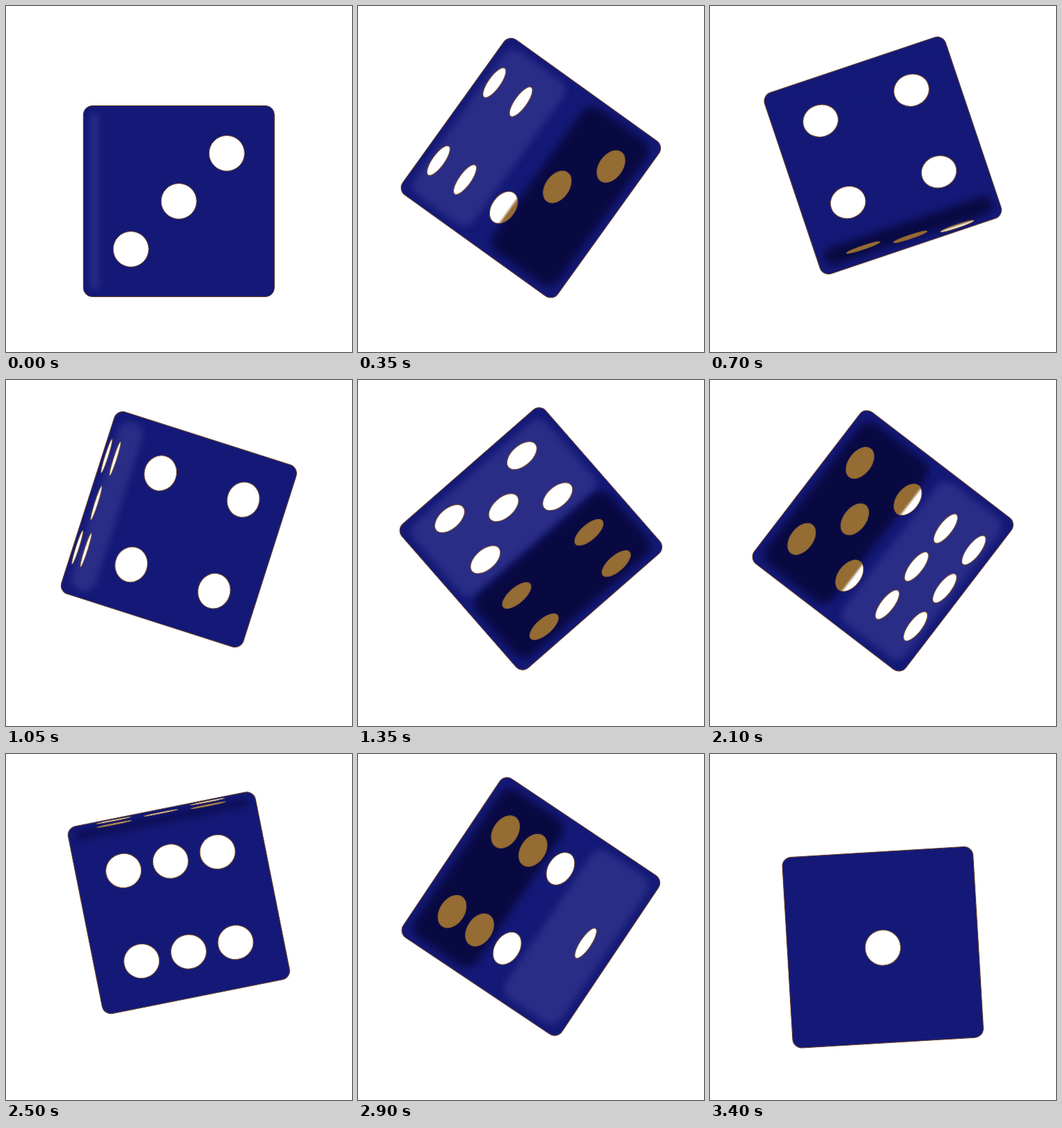
Write an HTML page with a canvas that moves like this. It is 498 px wide and 498 px high and loops after 3450 ms.

```html
<!DOCTYPE html>
<html>
<head>
<meta charset="utf-8">
<title>Rolling die</title>
<style>
  html, body { margin: 0; width: 100%; height: 100%; overflow: hidden; background: #fff; }
  canvas { display: block; }
</style>
</head>
<body>
<canvas id="stage" width="498" height="498"></canvas>
<script>
const ctx = document.getElementById('stage').getContext('2d');
const STEP = 50, STEPS = 69;
const SIZE = 275, HALF = SIZE / 2, EDGE = 127, SPREAD = 69, PIP = 25.5;
const BLUE = '#141977', LIGHT = '#2a2d86', DARK = '#090942', WHITE = '#fff', TAN = '#946c34';

// Pip positions in units of SPREAD, in the order the faces appear
const FACES = [
  [[1, -1], [0, 0], [-1, 1]],
  [[-1, -1], [1, -1], [-1, 1], [1, 1]],
  [[-1, -1], [1, -1], [0, 0], [-1, 1], [1, 1]],
  [[-1, -1], [-1, 0], [-1, 1], [1, -1], [1, 0], [1, 1]],
  [[0, 0]]
];

// [step, degrees]
const TURN = [[0, 0], [14, 71.4], [27, 138.85], [42, 217.5], [50, 258.7], [58, 303.8], [66, 345.6], [68, 356.6]];

const rad = deg => deg * Math.PI / 180;
const clamp = v => Math.max(0, Math.min(1, v));

function turnAt(n) {
  const i = Math.max(1, TURN.findIndex(p => p[0] >= n));
  const [n0, a0] = TURN[i - 1], [n1, a1] = TURN[i];
  return a0 + (a1 - a0) * (n - n0) / (n1 - n0);
}

// One hop per half turn, with a short rest on the ground
function liftAt(turn) {
  const fromTop = clamp(Math.abs(turn % 180 - 90) / 88);
  return 67 * (1 - fromTop ** 2.6);
}

// Depth of a shaded patch: sweeps in, then follows the shrinking side
const depth = (deg, share, extra) => Math.min(4 * deg - 18, share * SIZE + extra);
const fade = deg => clamp((deg - 18) / 14);

function patch(x0, x1, color, alpha, blur) {
  if (x1 - x0 < 2 || alpha <= 0) return;
  ctx.save();
  ctx.filter = `blur(${blur}px)`;
  ctx.globalAlpha = alpha;
  ctx.fillStyle = color;
  ctx.beginPath();
  ctx.roundRect(x0, -EDGE, x1 - x0, 2 * EDGE, Math.min(18, (x1 - x0) / 2));
  ctx.fill();
  ctx.restore();
}

// Pips of a face squeezed along x to the given share of the square
function pipPath(face, share, center, odd) {
  const path = new Path2D();
  for (const [x, y] of FACES[face]) {
    const px = center + (odd ? -y : x) * SPREAD * share;
    const py = (odd ? x : y) * SPREAD;
    path.moveTo(px + PIP * share, py);
    path.ellipse(px, py, PIP * share, PIP, 0, 0, 2 * Math.PI);
  }
  return path;
}

function outline(path, color) {
  ctx.strokeStyle = color;
  ctx.lineWidth = 1;
  ctx.stroke(path);
}

function fill(path, color) {
  ctx.fillStyle = color;
  ctx.fill(path);
}

function draw(n) {
  const turn = turnAt(n);
  const side = Math.min(3, Math.floor(turn / 90));
  const odd = side % 2 === 1;
  const deg = turn - side * 90;
  const inShare = Math.sin(rad(deg)) ** 2, outShare = 1 - inShare;

  ctx.fillStyle = WHITE;
  ctx.fillRect(0, 0, 498, 498);
  ctx.save();
  ctx.translate(248.8, 281 - liftAt(turn));
  ctx.rotate(rad(turn - (odd ? 90 : 0)));

  const body = new Path2D();
  body.roundRect(-HALF, -HALF, SIZE, SIZE, 13);
  fill(body, BLUE);

  ctx.save();
  ctx.clip(body);
  const dark = HALF - depth(deg, outShare, 8);
  const light = depth(90 - deg, inShare, 22) - HALF;
  patch(-EDGE, light, LIGHT, fade(90 - deg), 5);
  patch(dark, EDGE, DARK, fade(deg), 6);

  if (inShare > 0.004) {
    const pips = pipPath(side + 1, inShare, -HALF * outShare, odd);
    fill(pips, WHITE);
    outline(pips, '#80582c');
  }
  if (outShare > 0.006) {
    const pips = pipPath(side, outShare, HALF * inShare, odd);
    fill(pips, WHITE);
    ctx.save();
    ctx.clip(pips);
    patch(dark - 3, EDGE + 3, TAN, fade(deg), 1.5);
    ctx.restore();
    outline(pips, '#80582c');
  }
  ctx.restore();

  outline(body, '#6a4428');
  ctx.restore();
}

let shown = -1;
function tick(now) {
  const n = Math.floor(now / STEP) % STEPS;
  if (n !== shown) draw(shown = n);
  requestAnimationFrame(tick);
}
draw(0);
requestAnimationFrame(tick);
</script>
</body>
</html>
```
